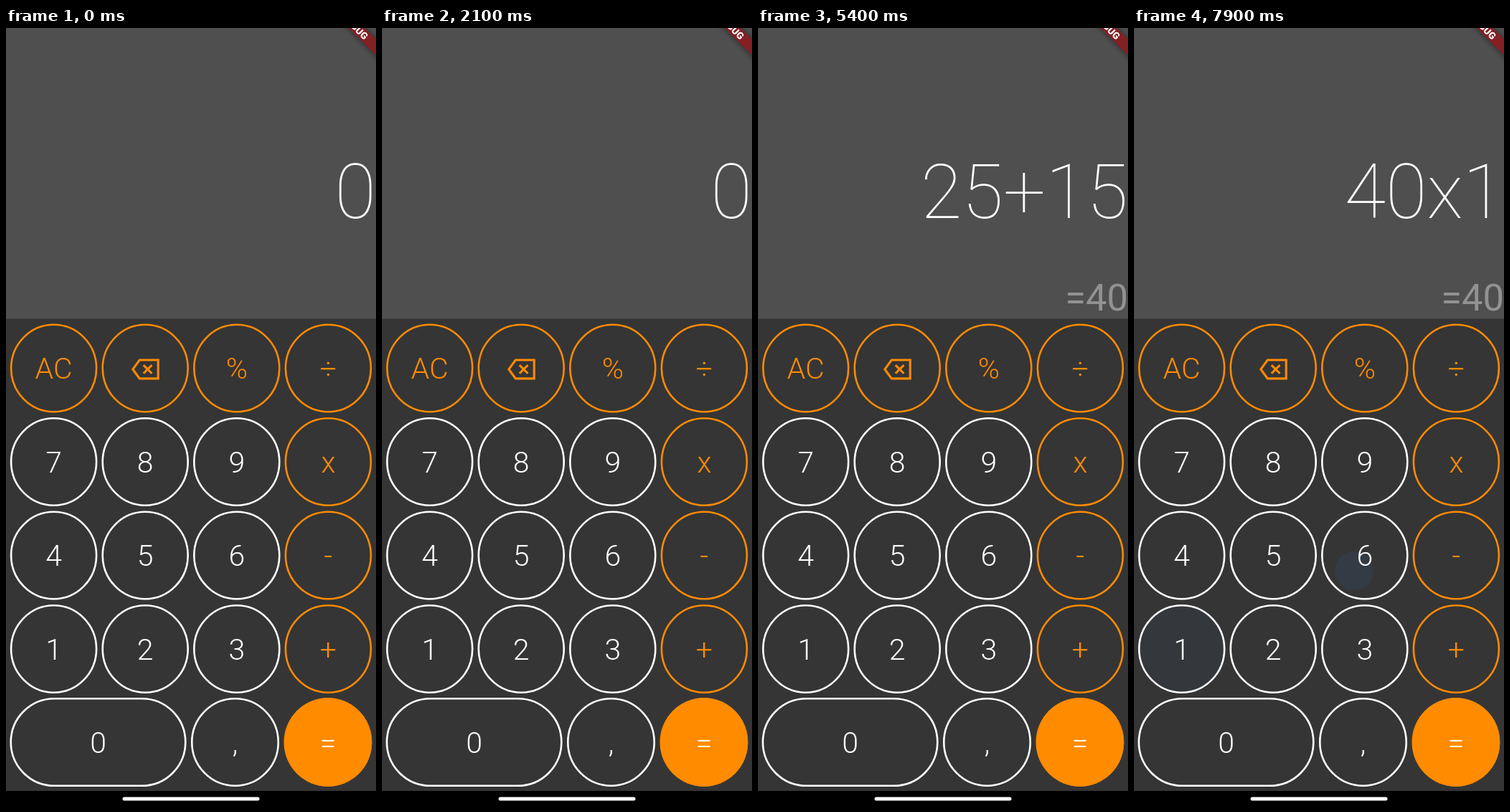
An HTML page that plays this animation: 516x1085 px, repeating every 8 s.

```html
<!DOCTYPE html>
<html lang="en">
<head>
<meta charset="utf-8">
<title>Calculator</title>
<style>
  html, body { margin: 0; width: 100%; height: 100%; overflow: hidden; background: #000; }
  svg { display: block; width: 100%; height: 100%; }
  text { font-family: Roboto, sans-serif; }
  .label { font-size: 41px; font-weight: 300; text-anchor: middle; }
  .entry { font-size: 105px; font-weight: 100; text-anchor: end; fill: #fff; }
  .preview { font-size: 52.5px; font-weight: 400; text-anchor: end; fill: #929292; }
  .band { fill: #842023; filter: drop-shadow(0 0 4px rgba(0, 0, 0, .5)); }
  .debug { font-size: 13.4px; font-weight: 900; text-anchor: end; fill: #fff; }
</style>
</head>
<body>
<svg id="stage" viewBox="0 0 516 1085">
  <rect width="516" height="1085" fill="#000"/>
  <rect width="516" height="1064" fill="#353535"/>
  <rect width="516" height="405.5" fill="#4f4f4f"/>
  <text id="entry" class="entry" x="516" y="265">0</text>
  <text id="preview" class="preview" x="516" y="393.5"></text>
  <g id="keys"></g>
  <rect x="162.5" y="1072.5" width="191" height="5" rx="2.5" fill="#fff"/>
  <g transform="translate(502.5 13.5) rotate(45)">
    <rect class="band" x="-120" y="-7.9" width="240" height="15.8"/>
    <text class="debug" y="4.8">DEBUG</text>
  </g>
</svg>
<script>
const LOOP = 8000;
const ORANGE = '#ff8b00', WHITE = '#fff';
const ROWS = [['AC', '⌫', '%', '÷'], ['7', '8', '9', 'x'], ['4', '5', '6', '-'], ['1', '2', '3', '+']];

// Taps: key, down and up times, touch offset from the key centre, resulting display.
const TAPS = [
  { key: '2', down: 2430, up: 2510, dx: 8, dy: 8, entry: '2' },
  { key: '5', down: 2860, up: 2940, dx: 8, dy: 8, entry: '25' },
  { key: '+', down: 3640, up: 3720, dx: 0, dy: 8, entry: '25+' },
  { key: '1', down: 4255, up: 4335, dx: 30, dy: 0, entry: '25+1', preview: '=26' },
  { key: '5', down: 4700, up: 4780, dx: 5, dy: 10, entry: '25+15', preview: '=40' },
  { key: '=', down: 5600, up: 5680, dx: 0, dy: 5, entry: '40' },
  { key: 'x', down: 6670, up: 6750, dx: 0, dy: 8, entry: '40x' },
  { key: '1', down: 7490, up: 7570, dx: 20, dy: 0, entry: '40x1', preview: '=40' },
  { key: '6', down: 7850, up: 7940, dx: -15, dy: 22, entry: '40x16', preview: '=640' }
];

const $ = id => document.getElementById(id);
function add(parent, tag, attrs) {
  const el = document.createElementNS('http://www.w3.org/2000/svg', tag);
  for (const name in attrs) el.setAttribute(name, attrs[name]);
  return parent.appendChild(el);
}

const keys = {};
function addKey(label, cx, cy, w, h, color, filled) {
  const group = add($('keys'), 'g', {});
  const shape = { x: cx - w / 2, y: cy - h / 2, width: w, height: h, rx: Math.min(w, h) / 2, ry: h / 2 };
  const clipId = 'clip' + Object.keys(keys).length;
  add(add(group, 'clipPath', { id: clipId }), 'rect', shape);
  if (filled) add(group, 'rect', { ...shape, fill: color });
  const ink = add(group, 'g', { 'clip-path': `url(#${clipId})` });
  if (!filled) add(group, 'rect', { ...shape, fill: 'none', stroke: color, 'stroke-width': 2.6 });
  if (label === '⌫') {
    add(group, 'path', {
      d: 'M23 4H7L1.2 12 7 20H23ZM10.4 8.4l7.2 7.2M17.6 8.4l-7.2 7.2',
      transform: `translate(${cx - 19.3} ${cy - 18}) scale(1.62)`,
      fill: 'none', stroke: color, 'stroke-width': 1.9
    });
  } else {
    add(group, 'text', { class: 'label', x: cx, y: cy + 14.6, fill: filled ? WHITE : color }).textContent = label;
  }
  keys[label] = { cx, cy, ink, reach: Math.hypot(w, h) / 2 };
}

ROWS.forEach((row, r) => row.forEach((label, c) =>
  addKey(label, 66.6 + 127.6 * c, 474.5 + 130.5 * r, 119, 121.5, r === 0 || c === 3 ? ORANGE : WHITE)));
addKey('0', 128.5, 996, 243.5, 121.5, WHITE);
addKey(',', 319.5, 996, 120.5, 121.5, WHITE);
addKey('=', 449, 996, 123, 124, ORANGE, true);

for (const tap of TAPS) tap.ripple = add(keys[tap.key].ink, 'circle', { fill: 'rgb(28,125,243)' });

const clamp = v => Math.min(1, Math.max(0, v));
const easeOut = v => 1 - (1 - v) ** 2;

function drawRipple({ key, down, up, dx, dy, ripple }, t) {
  const { cx, cy, reach } = keys[key];
  const held = clamp((Math.min(t, up) - down) / 1000) * 0.5;
  const grow = held + (1 - held) * easeOut(clamp((t - up) / 225));
  const alpha = t < down ? 0 : clamp((t - down) / 75) * (1 - clamp((t - up - 225) / 150));
  ripple.setAttribute('cx', cx + dx * (1 - grow));
  ripple.setAttribute('cy', cy + dy * (1 - grow));
  ripple.setAttribute('r', reach * 0.3 + (reach * 0.7 + 5) * grow);
  ripple.setAttribute('fill-opacity', 0.12 * alpha);
}

const start = performance.now();
function draw() {
  const t = (performance.now() - start) % LOOP;
  let shown = { entry: '0' };
  for (const tap of TAPS) {
    drawRipple(tap, t);
    if (t >= tap.up) shown = tap;
  }
  $('entry').textContent = shown.entry;
  $('preview').textContent = shown.preview || '';
  requestAnimationFrame(draw);
}
draw();
</script>
</body>
</html>
```
